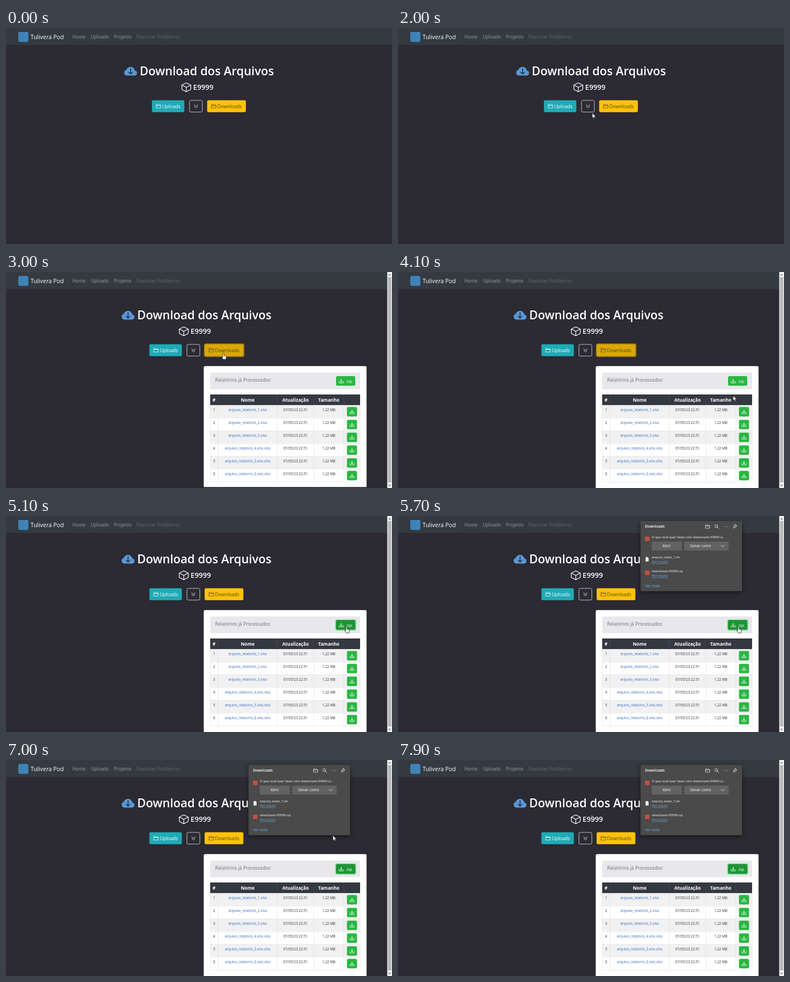
An HTML page with a canvas that plays this animation: 690x388 px, repeating every 8 s.

```html
<!DOCTYPE html>
<html lang="pt">
<head>
<meta charset="utf-8">
<title>Download dos Arquivos</title>
<style>
html, body { margin: 0; height: 100%; overflow: hidden; background: #2c2a32; }
canvas { display: block; width: 100vw; height: 100vh; }
</style>
</head>
<body>
<canvas id="stage"></canvas>
<script>
const W = 690, H = 388, LOOP = 8000, STEP = 100;
const FONT = '"Open Sans", "Noto Sans", sans-serif';
const canvas = document.getElementById('stage');
const ctx = canvas.getContext('2d');
const ratio = window.devicePixelRatio || 1;
canvas.width = W * ratio;
canvas.height = H * ratio;

const clamp = v => Math.min(1, Math.max(0, v));
const smooth = v => v * v * (3 - 2 * v);

// CSS "ease": cubic-bezier(.25, .1, .25, 1), solved by bisection
function ease(x) {
  if (x <= 0 || x >= 1) return clamp(x);
  const bez = (s, a, b) => 3 * s * (1 - s) * (1 - s) * a + 3 * s * s * (1 - s) * b + s * s * s;
  let lo = 0, hi = 1;
  for (let i = 0; i < 24; i++) {
    const mid = (lo + hi) / 2;
    if (bez(mid, .25, .25) < x) lo = mid; else hi = mid;
  }
  return bez(lo, .1, 1);
}

// Text placed by the vertical centre of its capitals
function text(str, x, cy, size, color = '#fff', weight = 400, align = 'left') {
  ctx.font = `${weight} ${size}px ${FONT}`;
  ctx.textAlign = align;
  ctx.fillStyle = color;
  ctx.fillText(str, x, cy + size * .357);
}

function rect(x, y, w, h, color) {
  ctx.fillStyle = color;
  ctx.fillRect(x, y, w, h);
}

function box(x, y, w, h, r, fill, stroke, line = 1) {
  ctx.beginPath();
  ctx.roundRect(x, y, w, h, r);
  if (fill) { ctx.fillStyle = fill; ctx.fill(); }
  if (stroke) { ctx.strokeStyle = stroke; ctx.lineWidth = line; ctx.stroke(); }
}

function strokePath(d, x, y, color, line = 1, scale = 1) {
  ctx.save();
  ctx.translate(x, y);
  ctx.scale(scale, scale);
  ctx.strokeStyle = color;
  ctx.lineWidth = line / scale;
  ctx.lineCap = ctx.lineJoin = 'round';
  ctx.stroke(new Path2D(d));
  ctx.restore();
}

function shape(d, x, y, fill, stroke, scale = 1) {
  ctx.save();
  ctx.translate(x, y);
  ctx.scale(scale, scale);
  const path = new Path2D(d);
  ctx.fillStyle = fill;
  ctx.fill(path);
  if (stroke) {
    ctx.strokeStyle = stroke;
    ctx.lineWidth = .8;
    ctx.lineJoin = 'round';
    ctx.stroke(path);
  }
  ctx.restore();
}

const CLOUD = 'M8 2a5.5 5.5 0 0 0-3.6 1.3c-.8.7-1.3 1.5-1.5 2.4C1.3 6.1 0 7.5 0 9.3 0 11.4 1.7 13 3.8 13h8.9C14.5 13 16 11.6 16 9.8c0-1.7-1.2-3-2.8-3.2C12.9 4 10.7 2 8 2z';
const CUBE = 'M0-8L8-4V4L0 8L-8 4V-4ZM-8-4L0 0L8-4M0 0V8';
const FOLDER = 'M-4-2.2V-3.4H-.8L.2-2.2H4V3.3H-4ZM-4-1.2H4';
const SAVE = 'M-4 .8V3.3H4V.8M0-3.8V1.2M-1.8-.6L0 1.2L1.8-.6';
const ARROW = 'M0 0V9.3L2.2 7.3L3.6 10.3L5 9.7L3.7 6.8H6.6Z';
const HAND = 'M0 0Q1.2-.3 1.3 1V4.2L4.3 4.7Q5.4 5 5.3 6.2L4.7 9.2V11H-.3L-2.9 7Q-3.3 5.8-2.2 6L-1 7V1Q-1-.2 0 0Z';

const DARK = '#52491a', GREEN = '#2ab642', GREEN_DARK = '#1f9436';

function drawNav() {
  rect(0, 0, W, 30.7, '#343a40');
  box(22, 7, 18, 18, 3, '#3f83b8');
  text('Tulivera Pod', 44, 16, 10.4);
  text('Home', 118.7, 16.2, 8.31, '#9a9da0');
  text('Uploads', 151.7, 16.2, 8.31, '#9a9da0');
  text('Projetos', 192.7, 16.2, 8.31, '#9a9da0');
  text('Reportar Problemas', 233.3, 16.2, 8.31, '#64686d');
}

function drawHeading(t) {
  shape(CLOUD, 211.2, 66.8, '#5699da', null, 1.44);
  strokePath('M0-5V5M-3.3 1.7L0 5L3.3 1.7', 222.7, 77.8, '#2c2a32', 1.5);
  text('Download dos Arquivos', 239, 77.8, 21.15, '#fff', 600);
  strokePath(CUBE, 322.3, 106.5, '#fff', 1.2);
  text('E9999', 334.5, 106.5, 12.8, '#fff', 600);

  box(260.8, 129.8, 58, 21.4, 2.5, '#1fabb6');
  strokePath(FOLDER, 272.7, 140.5, '#fff', .75);
  text('Uploads', 279.5, 141, 8.4);

  box(328, 130, 23, 21, 2.5, null, '#d0d0d4', .9);
  strokePath('M-3-2.5L0 .2L3-2.5M-3 .3L0 3L3 .3', 339.5, 140.5, '#e2e2e5', .9);

  const active = t >= 2400 && t < 5000;
  if (active && t >= 2600) box(358.2, 128.2, 72.6, 24.6, 4, '#8f7014');
  box(359.6, 129.8, 69.2, 21.4, 2.5, active ? '#dca808' : '#ffc20b');
  strokePath(FOLDER, 371.5, 140.5, DARK, .75);
  text('Downloads', 378, 141, 8.4, DARK);
}

function drawTable() {
  const edges = [369.5, 383.5, 489.5, 554.5, 608.5, 637.5];
  const mid = i => (edges[i] + edges[i + 1]) / 2;
  const top = 239, rowH = 22.95;
  const left = edges[0], width = edges[5] - left;

  rect(left, 220, width, 19, '#343840');
  for (const x of edges.slice(1, 5)) rect(x - .3, 220, .6, 19, '#4b5058');
  ['#', 'Nome', 'Atualização', 'Tamanho'].forEach((label, i) =>
    text(label, mid(i), 229.7, 8.2, '#fff', 700, 'center'));

  for (let i = 0; i < 6; i++) {
    const y = top + i * rowH, cy = y + 9;
    rect(left, y, width, rowH, i % 2 ? '#fff' : '#f1f1f2');
    rect(left, y, width, .6, '#dcdfe3');
    const name = `arquivo_relatorio_${i + 1}.xlsx${i > 2 ? '.xlsx' : ''}`;
    text(i + 1, mid(0), cy, 6.25, '#33363a', 400, 'center');
    text(name, mid(1), cy, 6.25, '#3a6bc8', 400, 'center');
    text('07/05/23 22:51', mid(2), cy, 6.25, '#33363a', 400, 'center');
    text('1.22 MB', mid(3), cy, 6.25, '#33363a', 400, 'center');
    box(614, y + 3.6, 18, 17, 2, GREEN);
    strokePath(SAVE, 623, y + 12.3, '#fff', .9, .9);
  }
  for (const x of edges) rect(x - .3, top, .6, rowH * 6, '#dcdfe3');
  rect(left, top + rowH * 6, width, .6, '#dcdfe3');
}

function drawPanel(t) {
  const height = 225 * ease((t - 2732) / 350);
  if (height <= 0) return;
  ctx.save();
  ctx.beginPath();
  ctx.rect(350, 169, 310, height);
  ctx.clip();
  box(358, 169, 291, 240, 2.5, '#fff');
  box(369.5, 180.5, 268, 30, 2, '#e8e8ec');
  text('Relatórios já Processados', 378.3, 194.5, 8.34, '#6b6e73');

  if (t >= 5000) box(593, 185.7, 37.5, 20, 3.5, '#7fd592');
  box(594.5, 187, 34.3, 17.3, 2.5, t >= 4700 ? GREEN_DARK : GREEN);
  strokePath(SAVE, 603.7, 196, '#fff', .9, .95);
  text('.zip', 611.5, 196, 7.3);
  drawTable();
  ctx.restore();
}

function drawScrollbar() {
  rect(681.5, 0, 8.5, H, '#f0f0f1');
  rect(682.8, 9, 6, 369, '#b9b9bb');
  shape('M-2 1L0-1.2L2 1Z', 685.8, 5, '#555');
  shape('M-2-1L0 1.2L2-1Z', 685.8, 383.5, '#555');
}

function drawPopup() {
  ctx.save();
  ctx.shadowColor = 'rgba(0,0,0,.45)';
  ctx.shadowBlur = 8 * ratio;
  ctx.shadowOffsetY = 2 * ratio;
  box(433.5, 9, 181.5, 126, 2, '#4a4a4a');
  ctx.restore();

  text('Downloads', 441.5, 19, 6.6, '#fff', 600);
  const ink = '#e4e4e4';
  strokePath(FOLDER, 553.5, 19, ink, .8, .9);
  strokePath('M1.8-.8A2.5 2.5 0 1 1-3.2-.8A2.5 2.5 0 1 1 1.8-.8M1.1 1L3.6 3.5', 569.7, 19, ink, .9);
  for (const x of [583, 586, 589]) box(x - .6, 18.4, 1.2, 1.2, .6, ink);
  strokePath('M.8-3.6L3.6-.8L1.4 .2L.5 2.7L-2.7-.5L-.2-1.4ZM-1.1 1.1L-3.6 3.6', 602.3, 18.7, ink, .9);

  box(441.5, 37, 8, 8, 0, '#c4503f');
  text('O que você quer fazer com downloads-E9999.zi...', 453.5, 38, 5.75);
  box(453.5, 46, 54, 16, 1.5, '#626262');
  text('Abrir', 480.5, 54, 6.4, '#fff', 400, 'center');
  box(511.5, 46, 79.5, 16, 1.5, '#626262');
  text('Salvar como', 522, 54, 6.6);
  strokePath('M-2.8-1.3L0 1.5L2.8-1.3', 580.5, 54, ink, .9);

  shape('M0 0H3.8L5.5 1.8V8H0Z', 442.5, 73.8, '#e9e9e9');
  box(441.5, 98, 8, 8, 0, '#c4503f');
  [['arquivo_texto_1.txt', 74], ['downloads-E9999.zip', 99]].forEach(([name, y]) => {
    text(name, 453.5, y, 5.68);
    text('Abrir arquivo', 453.5, y + 8.3, 4.75, '#69aee6');
    rect(453.5, y + 11.5, 29, .6, '#69aee6');
  });
  text('Ver mais', 441.5, 125.5, 6.6, '#69aee6');
}

// Pointer stops: time, x, y
const PATH = [
  [800, 676, 0], [1700, 368.5, 167], [2000, 347.2, 152.6], [2200, 347.2, 152.6],
  [2500, 388.7, 146], [3500, 388.7, 146], [4100, 599, 222], [4400, 599, 222],
  [4800, 608.5, 199], [6700, 608.5, 199], [7300, 560, 72], [7500, 560, 72],
  [7900, 346.5, 105]
];

function pointerAt(t) {
  const next = PATH.findIndex(stop => stop[0] >= t);
  if (next < 1) return PATH[PATH.length - 1].slice(1);
  const [t0, x0, y0] = PATH[next - 1], [t1, x1, y1] = PATH[next];
  const k = smooth((t - t0) / (t1 - t0));
  return [x0 + (x1 - x0) * k, y0 + (y1 - y0) * k];
}

function drawPointer(t) {
  if (t < 900) return;
  const [x, y] = pointerAt(t);
  const overButton = (t >= 2400 && t < 3600) || (t >= 4700 && t < 6800);
  if (t >= 7900) strokePath('M-1.3-4.5H1.3M0-4.5V4.5M-1.3 4.5H1.3', x, y, '#a9a9ad', .8);
  else if (overButton) shape(HAND, x, y, '#fff', '#222');
  else shape(ARROW, x, y, '#fff', '#222');
}

function draw(t) {
  ctx.setTransform(canvas.width / W, 0, 0, canvas.height / H, 0, 0);
  rect(0, 0, W, H, '#2c2a32');
  rect(0, 384, W, 4, '#29272f');
  drawNav();

  // The scrollbar narrows the page, so centred content moves left
  const scrolls = t >= 3000;
  ctx.save();
  if (scrolls) ctx.translate(-4.5, 0);
  drawHeading(t);
  drawPanel(t);
  ctx.restore();

  if (scrolls) drawScrollbar();
  if (t >= 5500) drawPopup();
  drawPointer(t);
}

const start = performance.now();
function tick() {
  const t = (performance.now() - start) % LOOP;
  draw(Math.floor(t / STEP) * STEP);
  requestAnimationFrame(tick);
}
tick();
</script>
</body>
</html>
```
